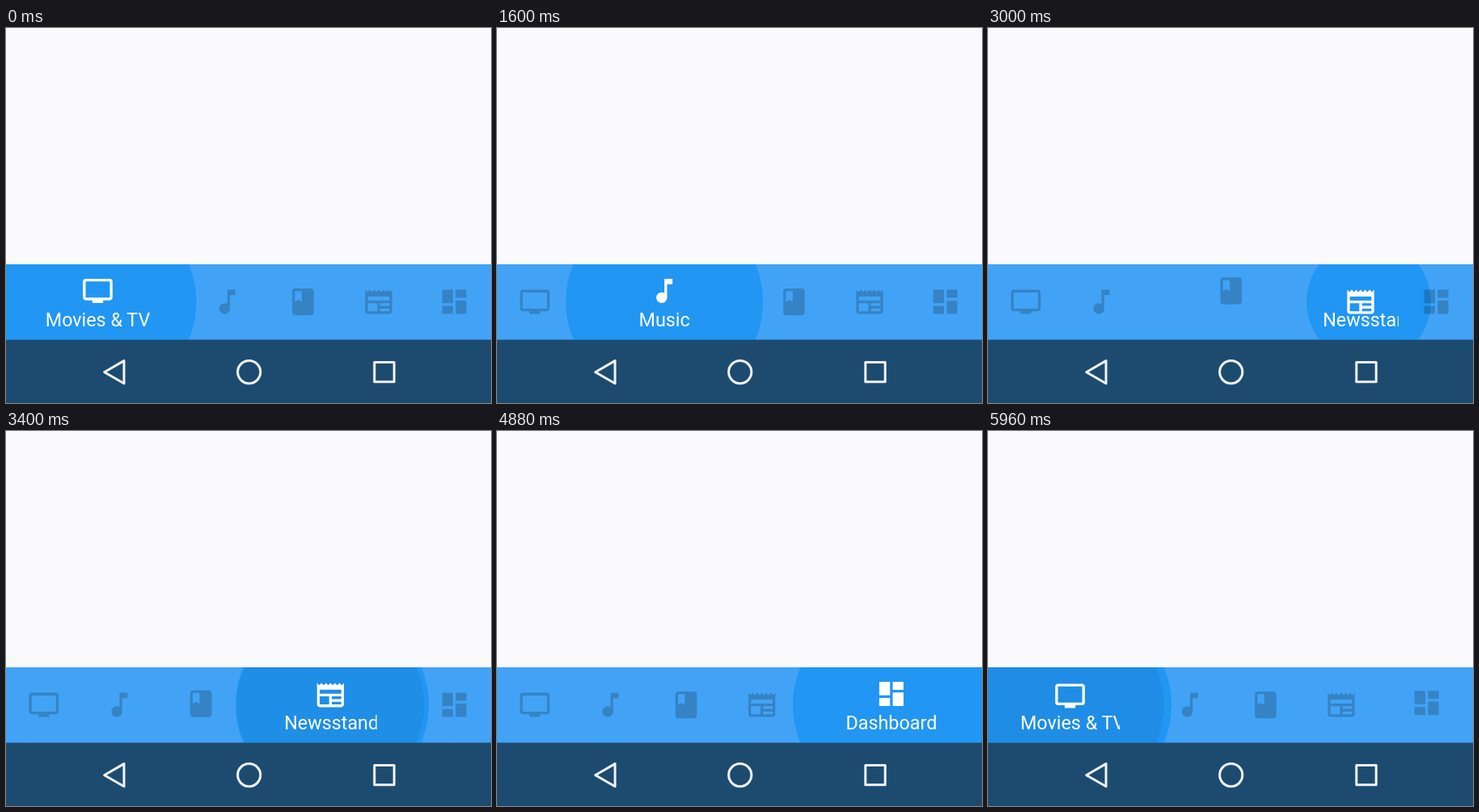
An HTML page for the animation above (6000 ms loop, 600 by 465 pixels).

```html
<!DOCTYPE html>
<html lang="en">
<head>
<meta charset="utf-8">
<title>Bottom navigation</title>
<style>
  html, body { margin: 0; width: 100%; height: 100%; overflow: hidden; background: #faf9fc; }
  svg { display: block; width: 600px; height: 465px; }
  text { font: 23.33px Roboto, Arial, sans-serif; fill: #fff; }
</style>
</head>
<body>
<svg id="stage" viewBox="0 0 600 465">
  <defs>
    <clipPath id="barClip"><rect y="293" width="600" height="93.5"/></clipPath>
    <clipPath id="labelClip"><rect id="labelBox" y="340" height="46"/></clipPath>
  </defs>
  <rect width="600" height="465" fill="#faf9fc"/>
  <rect y="293" width="600" height="94" fill="#42a3f6"/>
  <g clip-path="url(#barClip)">
    <circle id="spot" cy="339.6" fill="#2196f3"/>
    <circle id="ripple" cy="339.6" fill="#000"/>
    <g id="icons"></g>
    <g clip-path="url(#labelClip)"><text id="label" y="370"></text></g>
  </g>
  <rect y="386.5" width="600" height="79" fill="#1d4b70"/>
  <g fill="none" stroke="#f1f4f7" stroke-width="3" stroke-linejoin="round">
    <path d="M121.7 426.7L146 412.6V440.8Z"/>
    <circle cx="300.7" cy="426.6" r="14.1"/>
    <rect x="455.8" y="414.4" width="24.4" height="24.4"/>
  </g>
</svg>
<script>
const LOOP = 6000, DURATION = 420;
const SMALL = 93.6, WIDE = 227;      // tab widths
const TOP_Y = 326, MID_Y = 339.6;    // icon centres: active, inactive
const R_START = 77, R_END = 122;     // highlight radius

const tabs = [
  { label: 'Movies & TV', path: 'M21 3H3c-1.1 0-2 .9-2 2v12c0 1.1.9 2 2 2h5v2h8v-2h5c1.1 0 2-.9 2-2V5c0-1.1-.9-2-2-2zm0 14H3V5h18v12z' },
  { label: 'Music', path: 'M12 3v10.55c-.59-.34-1.27-.55-2-.55-2.21 0-4 1.79-4 4s1.79 4 4 4 4-1.79 4-4V7h4V3h-6z' },
  { label: 'Book', path: 'M18 2H6c-1.1 0-2 .9-2 2v16c0 1.1.9 2 2 2h12c1.1 0 2-.9 2-2V4c0-1.1-.9-2-2-2zM6 4h5v8l-2.5-1.5L6 12V4z' },
  { label: 'Newsstand', path: 'M22 3l-1.67 1.67L18.67 3 17 4.67 15.33 3l-1.66 1.67L12 3l-1.67 1.67L8.67 3 7 4.67 5.33 3 3.67 4.67 2 3v16c0 1.1.9 2 2 2h16c1.1 0 2-.9 2-2V3zM11 19H4v-6h7v6zM20 19h-7v-2h7v2zM20 15h-7v-2h7v2zM20 11H4V8h16v3z' },
  { label: 'Dashboard', path: 'M3 13h8V3H3v10zm0 8h8v-6H3v6zm10 0h8V11h-8v10zm0-18v6h8V3h-8z' }
];

// at: highlight appears, move: tabs start to slide, dx: touch point beside the tab centre
const taps = [
  { tab: 1, at: 840, move: 1049, dx: 6 },
  { tab: 2, at: 1960, move: 2002, dx: 12 },
  { tab: 3, at: 3000, move: 3070, dx: 10 },
  { tab: 4, at: 4160, move: 4225, dx: 10 },
  { tab: 0, at: 5640, move: 5658, dx: 28 }
];

const $ = id => document.getElementById(id);
const clamp = v => Math.min(1, Math.max(0, v));
const lerp = (a, b, p) => a + (b - a) * p;
const set = (el, attrs) => { for (const k in attrs) el.setAttribute(k, attrs[k]); };

const spot = $('spot'), ripple = $('ripple'), label = $('label'), labelBox = $('labelBox');
const icons = tabs.map(tab => {
  const el = document.createElementNS('http://www.w3.org/2000/svg', 'path');
  el.setAttribute('d', tab.path);
  return $('icons').appendChild(el);
});

function stateAt(t) {
  let now = { tab: 0, dx: 0, age: LOOP }, from = 4;
  for (const tap of taps) {
    if (t < tap.at) break;
    from = now.tab;
    now = { tab: tap.tab, dx: tap.dx, age: t - tap.move };
  }
  return { ...now, from };
}

function draw(t) {
  const { tab, from, dx, age } = stateAt(t);
  const x = clamp(age / DURATION);
  const p = (1 - Math.cos(Math.PI * x)) / 2;

  let left = 0, centre = 0;
  icons.forEach((icon, i) => {
    const open = i === tab ? p : i === from ? 1 - p : 0;
    const width = lerp(SMALL, WIDE, open);
    const cx = left + width / 2;
    const cy = lerp(MID_Y, TOP_Y, open);
    if (i === tab) centre = cx;
    set(icon, {
      transform: `translate(${cx - 20} ${cy - 20}) scale(1.6667)`,
      fill: i === tab ? '#fff' : '#000',
      'fill-opacity': i === tab ? 1 : 0.2
    });
    left += width;
  });

  set(spot, { cx: centre + dx * (1 - x), r: lerp(R_START, R_END, Math.sin(x * Math.PI / 2)) });
  set(ripple, {
    cx: centre,
    r: Math.min(116, Math.max(0, 0.66 * (age - 27))),
    'fill-opacity': 0.06 * clamp((540 - age) / 230)
  });

  if (label.textContent !== tabs[tab].label) label.textContent = tabs[tab].label;
  const full = label.getComputedTextLength();
  const box = full > SMALL ? lerp(SMALL, full, p) : full;
  set(label, { x: centre - box / 2 });
  set(labelBox, { x: centre - box / 2, width: box });
}

function tick(now) {
  draw(now % LOOP);
  requestAnimationFrame(tick);
}
draw(0);
requestAnimationFrame(tick);
</script>
</body>
</html>
```
